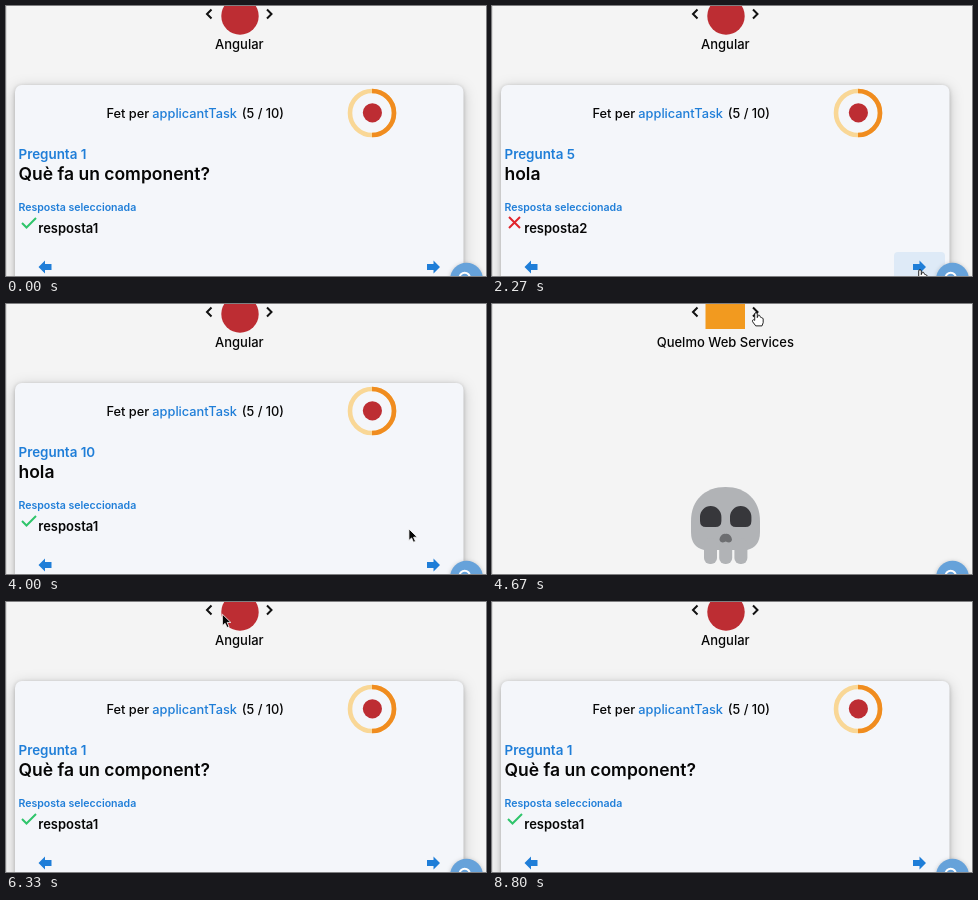
Recreate the animation shown at these times as an HTML page. Size 480 px wide and 270 px high, loop 9870 ms.

```html
<!DOCTYPE html>
<html lang="ca">
<head>
<meta charset="utf-8">
<title>Test</title>
<style>
html, body { margin: 0; width: 100%; height: 100%; overflow: hidden; background: #f4f4f4; }
svg { display: block; width: 100%; height: 100%; font: 600 13px Inter, "Open Sans", sans-serif; fill: #060606; }
.blue { fill: #1f7ed8; }
.line { fill: none; stroke-width: 2; }
.card { fill: #f4f6fa; filter: drop-shadow(0 1px 2px rgba(0,0,0,.2)) drop-shadow(0 3px 7px rgba(0,0,0,.2)); }
.header { font-size: 12.8px; font-weight: 500; }
.name { font-weight: 500; text-anchor: middle; }
.fab { fill: #66a2da; filter: drop-shadow(0 1px 2px rgba(0,0,0,.25)); }
</style>
</head>
<body>
<svg viewBox="0 0 480 270">
  <rect width="480" height="270" fill="#f4f4f4"/>
  <rect width="1" height="270" fill="#dcdcdc"/>

  <g id="quiz">
    <circle cx="234" cy="10" r="18.7" fill="#bd2d33"/>
    <text class="name" x="233.3" y="43">Angular</text>
    <rect class="card" x="9" y="79" width="448.5" height="230" rx="7"/>
    <g class="header">
      <text x="100.5" y="112">Fet per</text>
      <text class="blue" x="146.3" y="112">applicantTask</text>
      <text x="235.8" y="112">(5 / 10)</text>
    </g>
    <g class="line" style="stroke-width:4.6">
      <circle cx="366" cy="107" r="22" stroke="#f9d796"/>
      <path d="M366 85a22 22 0 0 1 0 44" stroke="#f08c1f"/>
    </g>
    <circle cx="366.4" cy="106.8" r="9.6" fill="#bd2d33"/>
    <text class="blue" id="number" x="12.5" y="152.5" font-size="13.4"></text>
    <text id="title" x="12.5" y="173.5" font-size="17.5"></text>
    <text class="blue" x="12.5" y="204.5" font-size="10.55">Resposta seleccionada</text>
    <path class="line" id="mark"/>
    <text id="answer" x="32.3" y="226.5"></text>
    <rect class="blue" id="tint" x="402" y="246" width="51" height="30" rx="4" opacity=".1"/>
    <path class="blue" d="M32.500 261l6.500-6.500v3.500h6.500v6h-6.500v3.500z"/>
    <path class="blue" d="M434 261l-6.500-6.500v3.500h-6.500v6h6.500v3.500z"/>
  </g>

  <g id="empty">
    <rect x="213.5" y="-15" width="39.5" height="40" fill="#f29a1f"/>
    <text class="name" x="233.3" y="43">Quelmo Web Services</text>
    <g fill="#b1b3b6">
      <path d="M199 217C199 196 213 183 233.500 183S268 196 268 217V228Q268 243 255 246H212Q199 243 199 228Z"/>
      <rect x="212" y="234" width="13" height="26" rx="6"/>
      <rect x="227.2" y="234" width="13" height="26" rx="6"/>
      <rect x="242.4" y="234" width="13" height="26" rx="6"/>
    </g>
    <path d="M208 213a10.700 11 0 0 1 21.400 0v4q0 6-6 6h-9.400q-6 0-6-6zM238 213a10.700 11 0 0 1 21.400 0v4q0 6-6 6h-9.400q-6 0-6-6z" fill="#37373b"/>
    <path d="M233.700 230C237 229 240 233 240 236Q239 240 233.700 237.500Q228.500 240 227.500 236C227.500 233 230.500 229 233.700 230Z" fill="#6d6e71"/>
  </g>

  <path class="line" d="M205.500 3.500L201 8l4.500 4.500M261 3.500l4.500 4.500-4.500 4.500" stroke="#111"/>
  <circle class="fab" cx="460.5" cy="273" r="16.3"/>
  <circle class="line" cx="458.7" cy="272" r="5.2" stroke="#fff"/>

  <g id="cursor">
    <path id="arrow" d="M0 0v11.500l2.700-2.500 1.900 4.300 2-.9-1.900-4.200h3.700z" stroke="#fff" stroke-width=".8"/>
    <path id="hand" transform="scale(.92)" d="M-1.400 8V1Q-1.400-.3 0-.3T1.400 1V5Q3-.2+4.800 4.200 5 5.200 6 5 7.500 5.200 7.800 6.500V10.500L6.500 14H-.3L-3.700 9.500Q-4.300 7.500-2.800 7.300Z" fill="#fff" stroke="#111"/>
  </g>
</svg>
<script>
const LOOP = 9870;
const $ = id => document.getElementById(id);
const show = (id, on) => $(id).style.display = on ? '' : 'none';

// Correct answers of the ten questions, and the marks shown for them
const correct = [1, 0, 0, 1, 0, 1, 1, 0, 0, 1];
const CHECK = 'M16 217l4.500 4.500L30 212', CROSS = 'M17 211l11 11M28 211l-11 11';

// Pointer stops: time, x, y
const stops = [
  [0, 458, 290], [330, 458, 272], [470, 441, 258], [600, 428, 264],
  [3870, 428, 264], [4400, 264, 9], [4830, 264, 9], [5270, 137, 7],
  [5670, 217, 12], [5830, 217, 12], [6000, 206, 7], [6270, 206, 7],
  [6800, 490, 150], [7430, 490, 160], [7465, 472.5, 165], [7540, 473, 166],
  [7670, 483, 178], [LOOP, 490, 190]
];

function pointer(t) {
  const i = stops.findIndex(s => s[0] > t);
  const [t0, x0, y0] = stops[i - 1], [t1, x1, y1] = stops[i];
  const k = (t - t0) / (t1 - t0), e = k * k * (3 - 2 * k);
  return [x0 + (x1 - x0) * e, y0 + (y1 - y0) * e];
}

function draw(t) {
  const quiz = t < 4670 || t >= 6200;
  const clicks = t < 900 || t > 4670 ? 0 : Math.min(9, 1 + Math.floor((t - 900) / 345));
  const ok = correct[clicks];
  show('quiz', quiz);
  show('empty', !quiz);
  $('number').textContent = 'Pregunta ' + (clicks + 1);
  $('title').textContent = clicks ? 'hola' : 'Què fa un component?';
  $('answer').textContent = ok ? 'resposta1' : 'resposta2';
  $('mark').setAttribute('d', ok ? CHECK : CROSS);
  $('mark').setAttribute('stroke', ok ? '#2fc56b' : '#e0242b');

  const [x, y] = pointer(t);
  const onNext = quiz && x > 402 && x < 453 && y > 246;
  const onChevron = y < 16 && (Math.abs(x - 203) < 8 || Math.abs(x - 263) < 8);
  show('tint', onNext && t >= 870);
  show('hand', onNext || onChevron);
  show('arrow', !onNext && !onChevron);
  $('cursor').setAttribute('transform', `translate(${x} ${y})`);
}

const start = performance.now();
function frame() {
  draw((performance.now() - start) % LOOP);
  requestAnimationFrame(frame);
}
frame();
</script>
</body>
</html>
```
